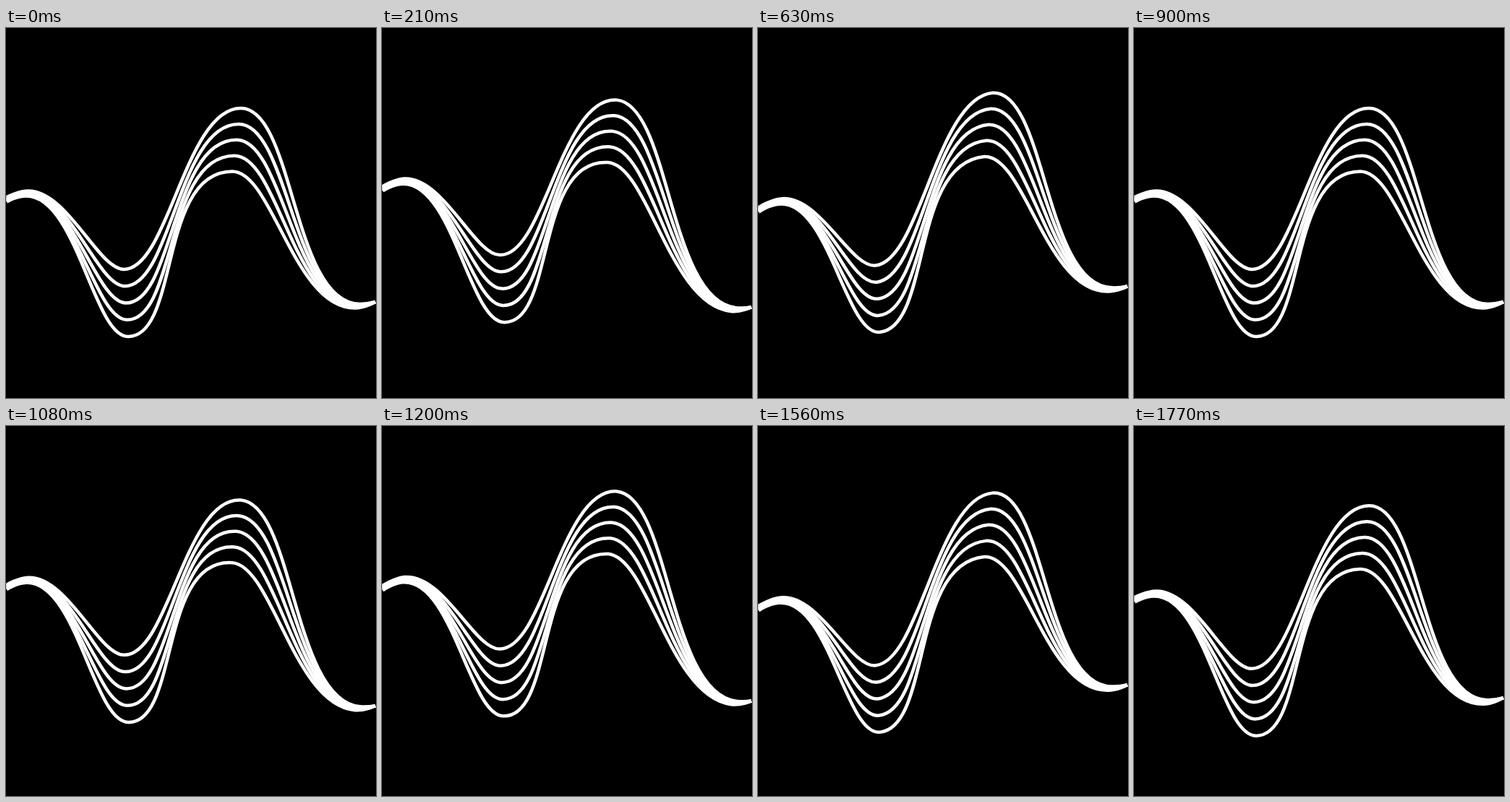
Write an HTML page with a canvas that moves like this. It is 512 px wide and 512 px high and loops after 1.8 s.

```html
<!DOCTYPE html>
<html>
<head>
<meta charset="utf-8">
<title>Wave lines</title>
<style>
html, body { margin: 0; width: 100%; height: 100%; overflow: hidden; background: #000; }
canvas { display: block; }
</style>
</head>
<body>
<canvas id="stage" width="512" height="512"></canvas>
<script>
const ctx = document.getElementById('stage').getContext('2d');
const PERIOD = 900, STEP = 30, LINES = 5, SWAY = 15;
const LAG = 0.3 * Math.PI / 180; // phase per pixel

// Crests and troughs of the two outermost curves: x, y, handle to the left, handle to the right.
const upper = [[1, 234, 0, 0], [31, 225.5, 14, 54], [163, 334, 35, 62],
  [325, 111, 77, 74], [490, 382, 94, 10], [511, 379, 0, 0]];
const lower = [[1, 240.5, 0, 0], [28, 232.5, 14, 70], [169, 427, 48, 71],
  [313, 198.5, 102, 56], [483, 387.5, 85, 14], [511, 379, 0, 0]];

const blend = mix => upper.map((knot, k) => knot.map((v, j) => v + (lower[k][j] - v) * mix));

function draw(time) {
  const angle = 2 * Math.PI * Math.floor(time / STEP) * STEP / PERIOD;
  const sway = (x, y) => [x, y + SWAY * (Math.sin(LAG * x - angle) - Math.sin(LAG * x))];
  ctx.fillStyle = '#000';
  ctx.fillRect(0, 0, 512, 512);
  ctx.strokeStyle = '#fff';
  ctx.lineWidth = 4.5;
  for (let n = 0; n < LINES; n++) {
    const knots = blend(n / (LINES - 1));
    ctx.beginPath();
    ctx.moveTo(...sway(...knots[0]));
    for (let k = 1; k < knots.length; k++) {
      const [x0, y0, , right] = knots[k - 1], [x1, y1, left] = knots[k];
      ctx.bezierCurveTo(...sway(x0 + right, y0), ...sway(x1 - left, y1), ...sway(x1, y1));
    }
    ctx.stroke();
  }
}

const start = performance.now();
function tick() {
  draw((performance.now() - start) % PERIOD);
  requestAnimationFrame(tick);
}
tick();
</script>
</body>
</html>
```
